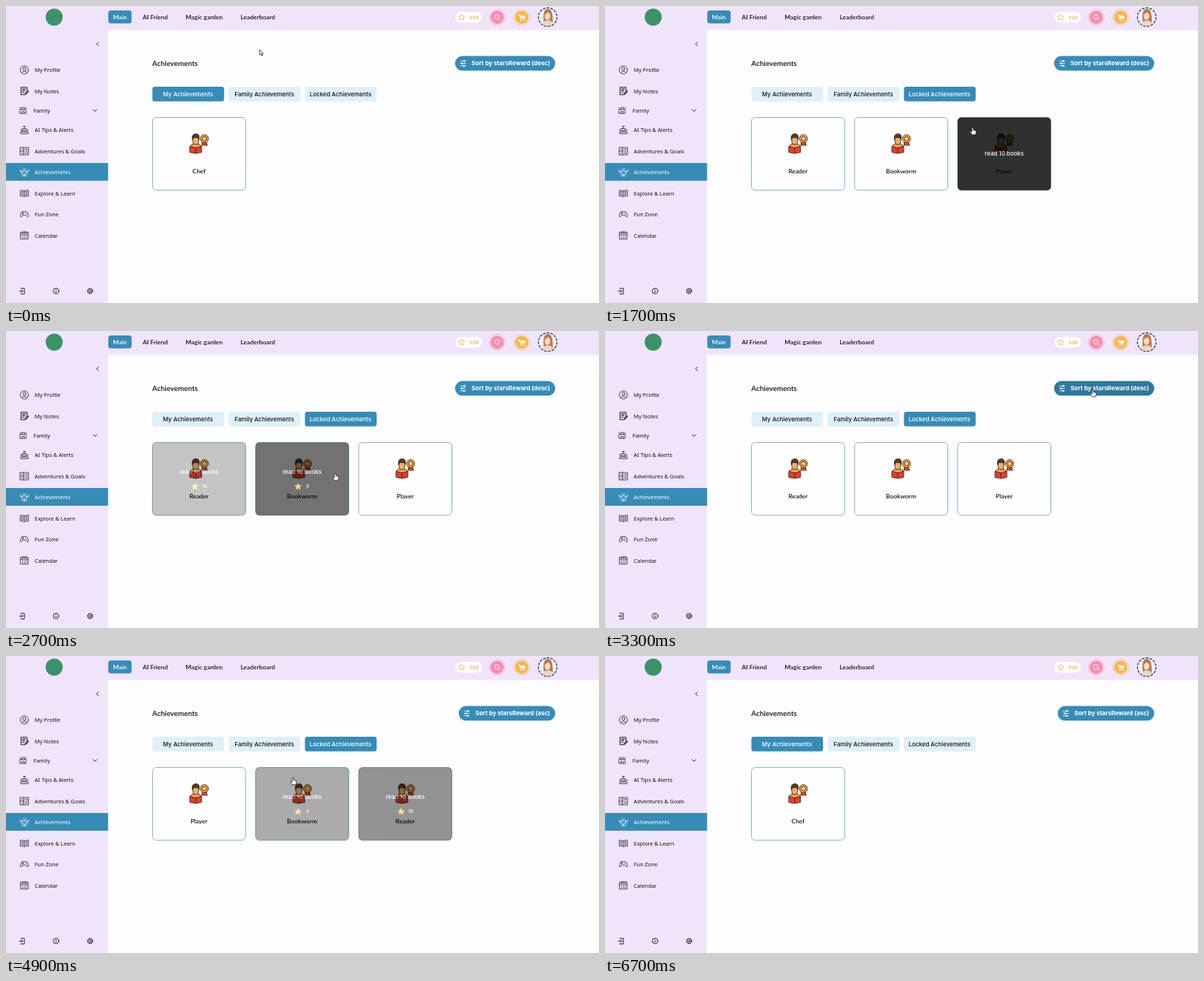
Animation of 800 by 401 pixels, one loop 6800 ms. Source, as an HTML page:

```html
<!DOCTYPE html>
<html lang="en">
<head>
<meta charset="utf-8">
<title>Achievements</title>
<style>
html, body { margin: 0; width: 100%; height: 100%; overflow: hidden; background: #fdfdfd; }
svg { display: block; width: 100%; height: 100%; }
text { fill: #111; }
.round { font: 600 8.4px "Comic Neue", "Comic Sans MS", Lato, sans-serif; }
.title { font-size: 9.9px; }
.side { font: 7.35px "Segoe UI", "Open Sans", sans-serif; fill: #111; }
.ui { font: 500 7.9px Poppins, Inter, sans-serif; }
.bold { font-weight: 700; font-size: 8px; }
.small { font-size: 6.6px; }
.mid { text-anchor: middle; }
.white { fill: #fff; }
.line { fill: none; stroke: #222; stroke-width: .8; stroke-linecap: round; stroke-linejoin: round; }
.line.light { stroke: #fff; }
</style>
</head>
<body>
<svg viewBox="0 0 800 401">
  <defs>
    <path id="star" d="M0-5 1.5-1.7 5-1.4 2.4 1 3.2 4.5 0 2.6-3.2 4.5-2.4 1-5-1.4-1.5-1.7Z"/>
    <g id="badge" stroke="#2b1a1a" stroke-width=".8" stroke-linejoin="round">
      <path d="M4.5-2 3.6 4 5.8 2.8 7.3 4.2 8.800 2.800 11 4 10-2Z" fill="#e8432c"/>
      <circle cx="7.3" cy="-5.5" r="5.4" fill="#f8a93c"/>
      <circle cx="7.3" cy="-5.5" r="2.9" fill="#fbd58a"/>
      <path d="M-12 7Q-12 2-7 1.500H-2Q3 2 3 7V10H-12Z" fill="#f0a45d"/>
      <path d="M-8.500-7H-.5V-3Q-.5 2.500-4.500 2.500T-8.500-3Z" fill="#f4ae68"/>
      <path d="M-9-4Q-10.500-12-4-12 1.500-12 0-4L-1.200-7H-7.500Z" fill="#5a3a28"/>
      <path d="M-12.500 4.800-4.500 7 3.500 4.800V13L-4.500 14.500-12.500 13ZM-4.500 7v7" fill="#e8402a"/>
    </g>
    <path id="profile" d="M5.500 0A5.500 5.500 0 1 1-5.500 0A5.500 5.500 0 1 1 5.500 0M2-1.500A2 2 0 1 1-2-1.500A2 2 0 1 1 2-1.500M-3.500 4a3.600 3 0 0 1 7 0"/>
    <path id="notes" stroke-width="1.1" d="M3.500-1V-5H-4.500V5H1M-2.500-2.700h4M-2.500-.4h3M-2.500 2h2M1 4.500 1.500 2.500 4.500-.5 5.500.5 2.500 4Z"/>
    <path id="family" d="M-4-1.500H4V4H-4ZM-2-1.500V-4H2V-1.500M-1.500 4V1H1.500V4M-4-4v1M4-4v1"/>
    <path id="tips" d="M-2.500-2H2.500V1.500H-2.500ZM0-2V-5M-1.500-5h3M-1 0h.1M1 0h.1M-5 4.500V2.500H5V4.500ZM-4.500-1v2M4.500-1v2"/>
    <path id="goals" d="M-5.500-5H5.500V5H-5.500ZM-1-5V5M-5.500 0H-1M1-2.500h3M1 0h3M1 2.500h3M-4-3l1.500 1.500M-4 3.500-2.500 2"/>
    <path id="awards" d="M-3-1.500H3V1Q2 3 0 3T-3 1ZM-3-.5H-5.500V-3M3-.5H5.500V-3M0 3V5M-3 5H3M-2-5 0-3 2-5M-4.500 2l1 1M4.500 2l-1 1"/>
    <path id="learn" d="M0-3Q-2-4.500-5.500-4V4Q-2 3.500 0 4.500 2 3.500 5.500 4V-4Q2-4.500 0-3V4.500M-4-2h2.500M-4 0h2.500M-4 2h2.500M1.500-2H4M1.500 0H4M1.500 2H4"/>
    <path id="fun" d="M-3-3.500H3Q5-3 5.500 2.500 5 4.500 3.500 3L2 1H-2L-3.500 3Q-5 4.500-5.500 2.500-5-3-3-3.500M-3-1.200h2M-2-2.200v2M1.700-1.200h.1M3.200-1.200h.1"/>
    <path id="calendar" d="M-5-4H5V5H-5ZM-5-1.500H5M-2.500-5.500v2.500M0-5.500v2.500M2.500-5.500v2.500M-3 .5h1M-.5.5h1M2 .5h1M-3 3h1M-.5 3h1M2 3h1"/>
  </defs>

  <path d="M0 0H800V32.500H137.500V401H0Z" fill="#f0e4fb"/>
  <circle cx="65" cy="15" r="11.500" fill="#3c9268"/>
  <rect x="138" y="6" width="31.500" height="17.500" rx="3.500" fill="#368cb7"/>
  <g class="round">
    <text class="white" x="144.300" y="17.700">Main</text>
    <text x="184.500" y="17.700">AI Friend</text>
    <text x="242.300" y="17.700">Magic garden</text>
    <text x="316.500" y="17.700">Leaderboard</text>
    <text class="title" x="197.300" y="81">Achievements</text>
  </g>

  <rect x="606" y="8" width="36" height="14.500" rx="7.200" fill="#fff"/>
  <use href="#star" transform="translate(614.700 15.200) scale(.85)" fill="none" stroke="#f5b547"/>
  <text class="ui small" x="625.500" y="17.700" style="fill:#f2a93b">508</text>
  <g fill="none" stroke-dasharray="2 1">
    <circle cx="662.700" cy="15.200" r="10.600" stroke="#f29ab4"/>
    <circle cx="695.800" cy="15.200" r="10.600" stroke="#f5bd5c"/>
  </g>
  <circle cx="662.700" cy="15.200" r="9" fill="#f48fae"/>
  <circle cx="695.800" cy="15.200" r="9" fill="#f8b84e"/>
  <path class="line light" d="M665.300 14.600a3.100 3.100 0 1 0-6.200 0a3.100 3.100 0 1 0 6.200 0M664.600 17l2 2"/>
  <path d="M691 11.500h2l.6 1.500h7l-1 4h-5.400Z" fill="#fff"/>
  <g fill="#fff"><circle cx="695" cy="19" r="1"/><circle cx="699" cy="19" r="1"/></g>
  <g>
    <circle cx="730.800" cy="15" r="12.500" fill="#f3eef8" stroke="#1d3f66" stroke-width="1.300" stroke-dasharray="3.600 1.600"/>
    <path d="M725.500 21Q723.500 4 731 4T737.500 23Z" fill="#b97a4c"/>
    <path d="M723.500 24.500Q725 19.500 731 19.500T738 24.500Q731 29 723.500 24.500Z" fill="#f1d3c4"/>
    <ellipse cx="730.500" cy="13.200" rx="3.900" ry="5.600" fill="#fad9c2"/>
    <path d="M726.200 13Q726 5 731 5.500T735.500 13Q733.500 9.500 731 8.500Q728 10 726.200 13Z" fill="#b97a4c"/>
  </g>

  <rect y="212" width="137.700" height="23.900" fill="#368cb7"/>
  <path class="line" style="stroke-width:1" d="M124.700 48.700l-2.400 2.400 2.400 2.400M117.600 139.800l2.500 2.500 2.500-2.500"/>
  <g id="menu"></g>
  <g class="line" style="stroke-width:1">
    <path d="M20 381.200h4.800v7.600H20M18 385h4.500m-1.600-1.700 1.700 1.700-1.700 1.700"/>
    <circle cx="67.500" cy="384.800" r="3.700"/><path d="M67.500 384.500v2m0-3.900v.1"/>
    <circle cx="113.500" cy="384.800" r="3.100"/><circle cx="113.500" cy="384.800" r="1.100"/>
    <circle cx="113.500" cy="384.800" r="3.700" stroke-dasharray="1.400 1.500" stroke-linecap="butt"/>
  </g>

  <g id="tabs"></g>
  <g id="sort">
    <rect y="67.500" height="19.800" rx="9.900"/>
    <g class="line light">
      <path d="M0 74.300h7M0 77.500h7M0 80.700h7"/>
      <path d="M5 73.500v1.600M2 76.700v1.600M4.500 79.900v1.600" stroke-width="1.500"/>
    </g>
    <text class="ui bold white" x="734" y="80.100" text-anchor="end"></text>
  </g>
  <g id="cards"></g>
  <g id="cursor" stroke="#222" stroke-width=".8" stroke-linejoin="round" fill="#fff">
    <path d="M0 0V7.200L1.700 5.700 2.900 8.300 4 7.800 2.900 5.300H5Z"/>
    <path d="M-1 .6Q0-.6 1 .6V3.600L4 4.200Q5 4.500 4.800 5.600L4 9.800H-.8L-3.300 6.500Q-3.600 5.200-2.300 5.300L-1 6.400Z"/>
  </g>
</svg>

<script>
const LOOP = 6800, STEP = 100, FADE = 250;
const SHOW_LOCKED = 1050, SORT_ASC = 3550, SHOW_MINE = 5250, CURSOR_GONE = 6000;
const BLUE = '#368cb7', HOVER = '#2f789d', PALE = '#def0f9';
const $ = id => document.getElementById(id);

const menu = [
  ['My Profile', 'profile', 86.3],
  ['My Notes', 'notes', 114.8],
  ['Family', 'family', 141],
  ['AI Tips &amp; Alerts', 'tips', 167.5],
  ['Adventures &amp; Goals', 'goals', 196],
  ['Achievements', 'awards', 224.2],
  ['Explore &amp; Learn', 'learn', 252.8],
  ['Fun Zone', 'fun', 281.2],
  ['Calendar', 'calendar', 309.7]
];
$('menu').innerHTML = menu.map(([label, icon, y]) => {
  const on = icon === 'awards', shift = icon === 'family' ? -1.7 : 0;
  return `<use class="line ${on ? 'light' : ''}" href="#${icon}" x="${24.8 + shift}" y="${y}"/>
    <text class="side ${on ? 'white' : ''}" x="${38.8 + shift}" y="${y + 2.9}">${label}</text>`;
}).join('');

const tabX = [197.5, 300.5, 403.3], tabW = 96.7;
$('tabs').innerHTML = ['My', 'Family', 'Locked'].map((name, i) =>
  `<g><rect x="${tabX[i]}" y="109" width="${tabW}" height="19.800" rx="3"/>
  <text class="ui mid" x="${tabX[i] + tabW / 2 - .3}" y="121.600">${name} Achievements</text></g>`).join('');

const cardX = 197.6, cardStep = 139.1, cardW = 125.7, cardY = 150.6, cardH = 98.2;
$('cards').innerHTML = [0, 1, 2].map(i =>
  `<g transform="translate(${cardX + i * cardStep} ${cardY})">
    <rect width="${cardW}" height="${cardH}" rx="5" fill="#fefefe" stroke="#7fb3cf"/>
    <use href="#badge" x="62.800" y="34"/>
    <text class="round mid label" x="62.800" y="75.300"></text>
    <g class="cover">
      <rect width="${cardW}" height="${cardH}" rx="5" fill-opacity=".81"/>
      <text class="ui mid white task" x="62.800">read 10 books</text>
      <g class="reward">
        <use href="#star" x="57.300" y="59.400" fill="#f8bd48"/>
        <text class="ui small mid white" x="70.300" y="61.700"></text>
      </g>
    </g>
  </g>`).join('');
const cards = [...$('cards').children], tabs = [...$('tabs').children];

const mine = [['Chef', 0]];
const locked = [['Reader', 10], ['Bookworm', 5], ['Player', 0]];
const lockedAsc = [...locked].reverse();

// Pointer stops: time, x, y
const stops = [
  [0, 342, 59], [200, 342, 59], [850, 452, 116], [1100, 452, 116], [1450, 497, 162],
  [1700, 496, 164], [1850, 494, 168], [2150, 400, 184], [2330, 292, 194], [2460, 290, 194],
  [2670, 444, 192], [2750, 444, 192], [3150, 656, 79], [3300, 658, 79], [3700, 658, 79],
  [4150, 545, 200], [4500, 530, 212], [4650, 530, 212], [5150, 244, 116], [5600, 244, 116],
  [CURSOR_GONE, 300, 4], [LOOP, 300, 4]
];

function pointer(t) {
  const i = stops.findIndex(s => s[0] > t);
  const [t0, x0, y0] = stops[i - 1], [t1, x1, y1] = stops[i];
  const p = (t - t0) / (t1 - t0), e = p * p * (3 - 2 * p);
  return [x0 + (x1 - x0) * e, y0 + (y1 - y0) * e];
}

function listAt(t) {
  if (t < SHOW_LOCKED || t >= SHOW_MINE) return mine;
  return t < SORT_ASC ? locked : lockedAsc;
}

const inside = ([px, py], x, y, w, h) => px >= x && px <= x + w && py >= y && py <= y + h;
const overCard = (p, i) => inside(p, cardX + i * cardStep, cardY, cardW, cardH);

// Share of the last FADE ms spent over the card gives a linear fade in and out
function coverage(i, t) {
  const list = listAt(t), n = 25;
  let hits = 0;
  for (let k = 0; k < n; k++) {
    const past = t - k * FADE / n;
    if (past >= 0 && listAt(past) === list && overCard(pointer(past), i)) hits++;
  }
  return hits / n;
}

function draw(t) {
  const p = pointer(t), list = listAt(t), active = list === mine ? 0 : 2;
  let hand = false;

  tabs.forEach((tab, i) => {
    const over = inside(p, tabX[i], 109, tabW, 20);
    hand ||= over;
    tab.children[0].setAttribute('fill', i === active ? (over ? HOVER : BLUE) : PALE);
    tab.children[1].style.fill = i === active ? '#fff' : '#111';
  });

  const asc = t >= SORT_ASC, x = asc ? 610.7 : 605.8;
  const overSort = inside(p, x, 67.5, 741 - x, 19.8);
  const [pill, sliders, label] = $('sort').children;
  pill.setAttribute('x', x);
  pill.setAttribute('width', 741 - x);
  pill.setAttribute('fill', overSort ? HOVER : BLUE);
  sliders.setAttribute('transform', `translate(${x + 7.5} 0)`);
  label.textContent = `Sort by starsReward (${asc ? 'asc' : 'desc'})`;
  hand ||= overSort;

  cards.forEach((card, i) => {
    const item = list[i];
    card.style.display = item ? '' : 'none';
    if (!item) return;
    const find = s => card.querySelector(s);
    find('.label').textContent = item[0];
    find('.cover').style.opacity = coverage(i, t);
    find('.task').setAttribute('y', item[1] ? 42 : 51.5);
    find('.reward').style.display = item[1] ? '' : 'none';
    find('.reward text').textContent = item[1];
    hand ||= overCard(p, i);
  });

  const cursor = $('cursor');
  cursor.style.display = t < CURSOR_GONE ? '' : 'none';
  cursor.setAttribute('transform', `translate(${p})`);
  cursor.children[0].style.display = hand ? 'none' : '';
  cursor.children[1].style.display = hand ? '' : 'none';
}

const start = performance.now();
function tick() {
  const t = (performance.now() - start) % LOOP;
  draw(Math.floor(t / STEP) * STEP);
  requestAnimationFrame(tick);
}
tick();
</script>
</body>
</html>
```
